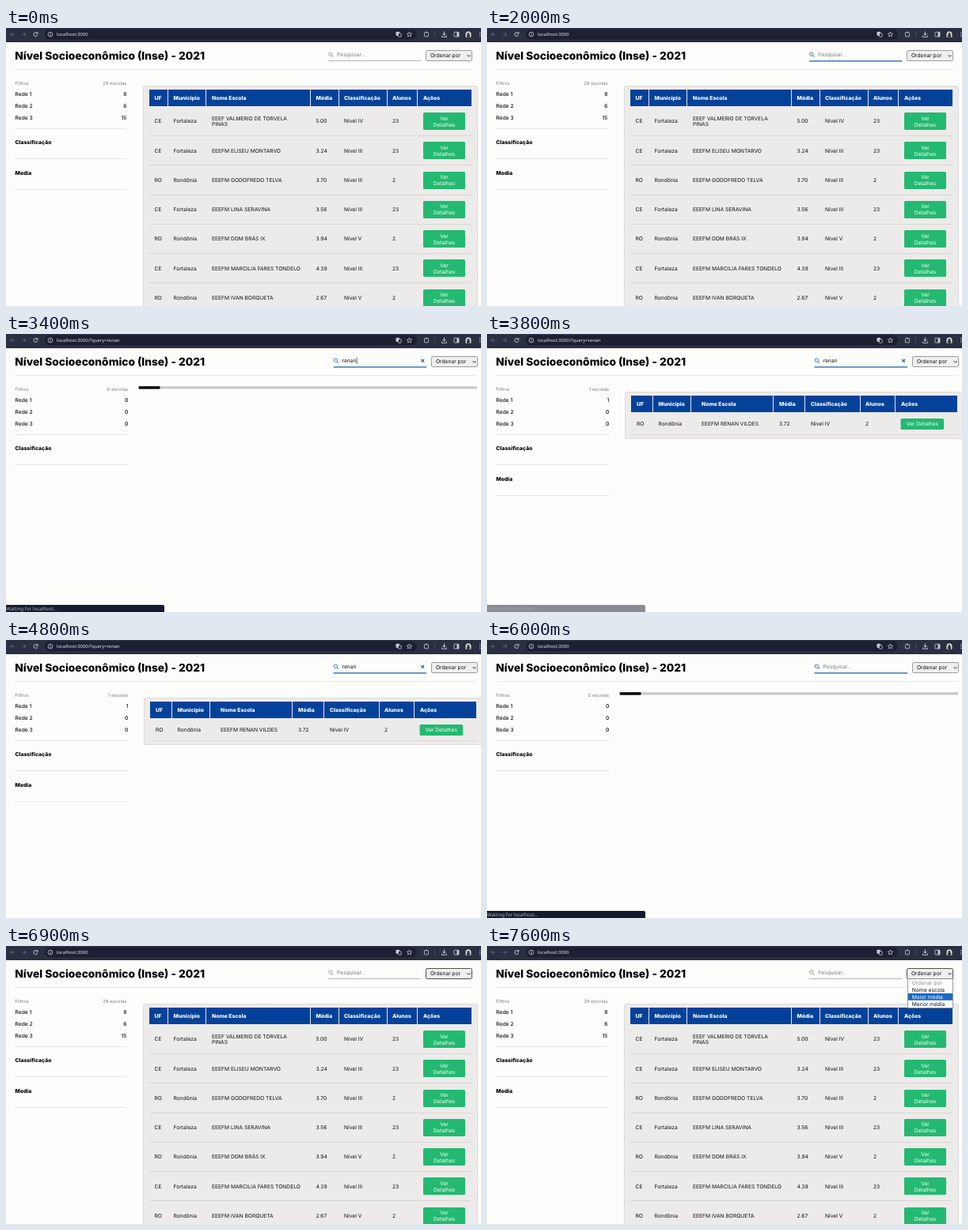
An HTML page with a canvas that plays this animation: 600x352 px, repeating every 8000 ms.

```html
<!DOCTYPE html>
<html lang="pt-BR">
<head>
<meta charset="utf-8">
<title>Nível Socioeconômico</title>
<style>
html, body { margin: 0; width: 100%; height: 100%; overflow: hidden; background: #fdfdfc; }
canvas { display: block; width: 600px; height: 352px; }
</style>
</head>
<body>
<canvas id="stage"></canvas>
<script>
const W = 600, H = 352, LOOP = 8000;
const canvas = document.getElementById('stage');
const ctx = canvas.getContext('2d');
const ratio = window.devicePixelRatio || 1;
canvas.width = W * ratio;
canvas.height = H * ratio;

const INTER = 'Inter, sans-serif', SYSTEM = '"Noto Sans", sans-serif';
const SIZE = 6.7;
const INK = '#111', BLUE = '#04429a', FOCUS = '#1763a6', GREEN = '#24b970', RULE = '#e6e6e8';
const BOLD = { size: 6.8, weight: 800, color: '#000' };
const QUERY = 'renan';

const HEADS = ['UF', 'Município', 'Nome Escola', 'Média', 'Classificação', 'Alunos', 'Ações'];
const SCHOOLS = [
  ['CE', 'Fortaleza', 'EEEF VALMERIO DE TORVELA|PINAS', '5.00', 'Nível IV', '23'],
  ['CE', 'Fortaleza', 'EEEFM ELISEU MONTARVO', '3.24', 'Nível III', '23'],
  ['RO', 'Rondônia', 'EEEFM GODOFREDO TELVA', '3.70', 'Nível III', '2'],
  ['CE', 'Fortaleza', 'EEEFM LINA SERAVINA', '3.56', 'Nível III', '23'],
  ['RO', 'Rondônia', 'EEEFM DOM BRÁS IX', '3.94', 'Nível V', '2'],
  ['CE', 'Fortaleza', 'EEEFM MARCILIA FARES TONDELO', '4.39', 'Nível III', '23'],
  ['RO', 'Rondônia', 'EEEFM IVAN BORQUETA', '2.67', 'Nível V', '2']
];
const FOUND = ['RO', 'Rondônia', 'EEEFM RENAN VILDES', '3.72', 'Nível IV', '2'];

const WIDE = {
  x: 173, right: 596, bottom: 380, left: 181, end: 588,
  cols: [187.5, 211.5, 260, 391.5, 427, 488, 527],
  seps: [204, 252, 384, 420, 481, 519]
};
const SINGLE = {
  x: 174, right: 603, bottom: 133, left: 182, end: 594,
  cols: [189, 216.5, 271, 369, 409, 478, 523],
  seps: [209, 257, 361, 401, 471, 515]
};

const within = (t, a, b) => t >= a && t < b;

function rect(x, y, w, h, fill, r = 0, stroke) {
  ctx.beginPath();
  ctx.roundRect(x, y, w, h, r);
  if (fill) { ctx.fillStyle = fill; ctx.fill(); }
  if (stroke) { ctx.strokeStyle = stroke; ctx.lineWidth = 0.8; ctx.stroke(); }
}

function path(points, color, width = 1) {
  ctx.beginPath();
  points.forEach(([x, y], i) => i ? ctx.lineTo(x, y) : ctx.moveTo(x, y));
  ctx.strokeStyle = color;
  ctx.lineWidth = width;
  ctx.stroke();
}

function arc(x, y, r, color, from = 0, to = Math.PI * 2, width = 0.9) {
  ctx.beginPath();
  ctx.arc(x, y, r, from, to);
  ctx.strokeStyle = color;
  ctx.lineWidth = width;
  ctx.stroke();
}

function dot(x, y, r, color) {
  ctx.beginPath();
  ctx.arc(x, y, r, 0, Math.PI * 2);
  ctx.fillStyle = color;
  ctx.fill();
}

// y is the vertical middle of the capitals
function text(s, x, y, { size = SIZE, weight = 400, color = INK, align = 'left', font = INTER } = {}) {
  ctx.font = `${weight} ${size}px ${font}`;
  ctx.textRendering = 'geometricPrecision';
  ctx.textAlign = align;
  ctx.fillStyle = color;
  ctx.fillText(s, x, y + size * 0.36);
  return ctx.measureText(s).width;
}

function browserBar(url) {
  const icon = '#c9ccd8', dim = '#6d7286', dark = '#1c2032';
  rect(0, 0, W, 18, '#2b2f42');
  rect(49, 1.5, 470, 13, dark, 6.5);
  path([[10.5, 8], [5.5, 8]], dim, 0.8);
  path([[8, 5.5], [5.5, 8], [8, 10.5]], dim, 0.8);
  path([[20, 8], [25, 8]], dim, 0.8);
  path([[22.5, 5.5], [25, 8], [22.5, 10.5]], dim, 0.8);
  arc(37.5, 8, 2.5, icon, 0.3, 5.5);
  path([[40, 4.9], [40, 7.2], [37.8, 7.2]], icon, 0.9);
  arc(56, 8, 2.9, icon, 0, Math.PI * 2, 0.8);
  path([[56, 7.5], [56, 9.8]], icon, 0.8);
  rect(55.6, 6, 0.8, 0.8, icon);
  text(url, 64, 8.2, { size: 5.85, color: '#e3e5ec', font: SYSTEM });

  rect(492.5, 4.8, 4.6, 5, icon, 0.7);
  rect(495.5, 6.8, 3.7, 4.4, dark, 0.6, icon);
  const star = [];
  for (let i = 0; i <= 10; i++) {
    const r = i % 2 ? 1.5 : 3.3, a = -Math.PI / 2 + i * Math.PI / 5;
    star.push([509.5 + r * Math.cos(a), 8.2 + r * Math.sin(a)]);
  }
  path(star, icon, 0.8);
  rect(528.5, 5.6, 5, 5.2, null, 0.6, icon);
  dot(531, 5.3, 0.9, icon);
  path([[541.5, 4], [541.5, 12]], '#555a70', 0.7);
  path([[553.5, 4.5], [553.5, 9]], icon);
  path([[551.3, 7], [553.5, 9.2], [555.7, 7]], icon);
  path([[550.5, 9.5], [550.5, 11.3], [556.5, 11.3], [556.5, 9.5]], icon, 0.9);
  rect(566, 5.2, 6, 5.8, null, 0.5, icon);
  rect(569.5, 5.2, 2.5, 5.8, icon);
  rect(580.5, 4.3, 7, 7.4, '#d5d8d2', [3.5, 3.5, 1, 1]);
  dot(584, 7.4, 1.5, '#2a3036');
  rect(582, 8.6, 4, 3.2, '#2a3036', 1.2);
  for (let y = 5.5; y < 11; y += 2.5) dot(598.8, y, 0.7, icon);
}

function searchBox(x, t, typed) {
  const focused = within(t, 1000, 6900);
  const tone = focused ? FOCUS : '#8b8b8b';
  arc(x + 2.9, 33.2, 2.2, tone, 0, Math.PI * 2, 0.8);
  path([[x + 4.5, 34.9], [x + 6.5, 36.9]], tone, 0.9);
  rect(x, 41.2, 117.5, focused ? 1.3 : 0.8, focused ? FOCUS : '#a0a0a0');

  let end = x + 11;
  if (typed) {
    end += text(typed, end, 33.8);
    const cx = x + 112.8;
    path([[cx - 1.8, 32], [cx + 1.8, 35.6]], FOCUS, 1.1);
    path([[cx + 1.8, 32], [cx - 1.8, 35.6]], FOCUS, 1.1);
  } else {
    text('Pesquisar...', end, 33.8, { color: '#7c7c7c' });
  }
  const blink = [[1000, 1600], [2200, 3600], [4200, 4800], [5400, 6000], [6400, 6900]];
  if (blink.some(([a, b]) => within(t, a, b))) rect(end + 0.3, 29.5, 0.7, 8.5, '#222');
}

function sortBox(left, active) {
  const x = Math.round(left);
  rect(x + 0.5, 28.5, 58, 13, '#efefef', 1.8, active ? '#222' : '#858585');
  text('Ordenar por', x + 6, 35);
  path([[x + 52.6, 34.2], [x + 54.6, 36.2], [x + 56.6, 34.2]], '#222', 1);
}

function sortMenu(t) {
  rect(531.5, 41.5, 57, 37, '#fff', 0, '#858585');
  const picked = t < 7600 ? -1 : 2;
  ['Ordenar por', 'Nome escola', 'Maior média', 'Menor média'].forEach((label, i) => {
    const y = 46.6 + i * 8.85;
    if (i === picked) rect(532, y - 4.4, 56, 8.8, '#1967c6');
    text(label, 536.8, y, { color: i === picked ? '#fff' : i ? INK : '#8d8d8d' });
  });
}

function sidebar(right, counts, total, loading) {
  const grey = { size: 5.9, color: '#7c7c7c' };
  text('Filtros', 11.5, 69.7, grey);
  text(total + ' escolas', right, 69.7, { ...grey, align: 'right' });
  counts.forEach((n, i) => {
    const y = 84 + i * 14.6;
    text('Rede ' + (i + 1), 11.5, y, { weight: 500 });
    text(n, right, y, { weight: 500, align: 'right' });
  });
  text('Classificação', 11.5, 145, BOLD);
  if (!loading) text('Media', 11.5, 183.7, BOLD);
  for (const y of loading ? [127, 165] : [127, 165, 204]) {
    rect(11.5, y, right - 11.5, 1, RULE);
  }
}

function tableRow(cols, row, y) {
  row.forEach((cell, i) => {
    const lines = cell.split('|');
    lines.forEach((line, k) => text(line, cols[i], y + (k - (lines.length - 1) / 2) * 7.6));
  });
}

function table(g, single) {
  rect(g.x + 0.5, 73.5, g.right - g.x - 1, g.bottom - 74, '#ecebea', 2, '#d6d5d5');
  rect(g.left, 78, g.end - g.left, 21, BLUE);
  for (const x of g.seps) rect(x, 78, 1, 21, '#dfe4ee');
  HEADS.forEach((h, i) => text(h, g.cols[i], 88.6, { ...BOLD, color: '#fff' }));
  const label = { color: '#f4fff9', align: 'center' };
  if (single) {
    tableRow(g.cols, FOUND, 114);
    rect(522.6, 107, 54.5, 14, GREEN, 1.6);
    text('Ver Detalhes', 549.8, 114, label);
    rect(g.left, 127, g.end - g.left, 1, '#dcdbda');
    return;
  }
  SCHOOLS.forEach((row, i) => {
    const y = 118 + i * 37.25, top = Math.round(y);
    tableRow(g.cols, row, y);
    rect(527, top - 11, 53, 22, GREEN, 1.6);
    text('Ver', 553.5, y - 3.7, label);
    text('Detalhes', 553.5, y + 4.1, label);
    rect(g.left, top + 18, g.end - g.left, 1, '#d8d7d6');
  });
}

function statusBubble(alpha) {
  if (alpha <= 0) return;
  ctx.globalAlpha = alpha;
  rect(-1, 343, 201, 10, '#161b2d', [0, 2, 0, 0]);
  text('Waiting for localhost...', 0, 347.5, { size: 6.2, color: '#b4b8c2', font: SYSTEM });
  ctx.globalAlpha = 1;
}

// full for a while after a request, then fades in quarter steps
function statusAlpha(t) {
  const fade = start => Math.min(1, 1 - (Math.floor((t - start) / 100) + 1) / 4);
  if (within(t, 3400, 4000)) return fade(3700);
  if (within(t, 6000, 6700)) return fade(6400);
  return 0;
}

function typedText(t) {
  if (t >= 5600) return '';
  return QUERY.slice(0, [2200, 2300, 2400, 2600, 2900].filter(at => t >= at).length);
}

function draw(t) {
  const loading = within(t, 3400, 3500) || within(t, 6000, 6100);
  const found = within(t, 3500, 6000);
  const narrow = !loading && !found;
  const shift = narrow ? 0 : 6.5;
  const right = narrow ? 152.4 : 154.2;

  ctx.setTransform(ratio, 0, 0, ratio, 0, 0);
  rect(0, 0, W, H, '#fdfdfc');
  browserBar('localhost:3000' + (within(t, 3400, 6000) ? '/?query=' + QUERY : ''));
  text('Nível Socioeconômico (Inse) - 2021', 11.3, 34.7, { ...BOLD, size: 13.78 });
  searchBox(407 + shift, t, typedText(t));
  sortBox(530 + shift, t >= 6900);
  rect(11.5, 52, 577.5 + shift, 1, RULE);

  if (loading) {
    sidebar(right, [0, 0, 0], 0, true);
    rect(167.7, 66.2, 427.3, 3.4, '#c9c9c9');
    rect(167.7, 66.2, 26.7, 3.4, '#000');
  } else if (found) {
    sidebar(right, [1, 0, 0], 1);
    table(SINGLE, true);
  } else {
    sidebar(right, [8, 6, 15], 29);
    table(WIDE);
  }
  if (t >= 7400) sortMenu(t);
  statusBubble(statusAlpha(t));
}

const start = performance.now();
function tick() {
  draw((performance.now() - start) % LOOP);
  requestAnimationFrame(tick);
}
tick();
</script>
</body>
</html>
```
